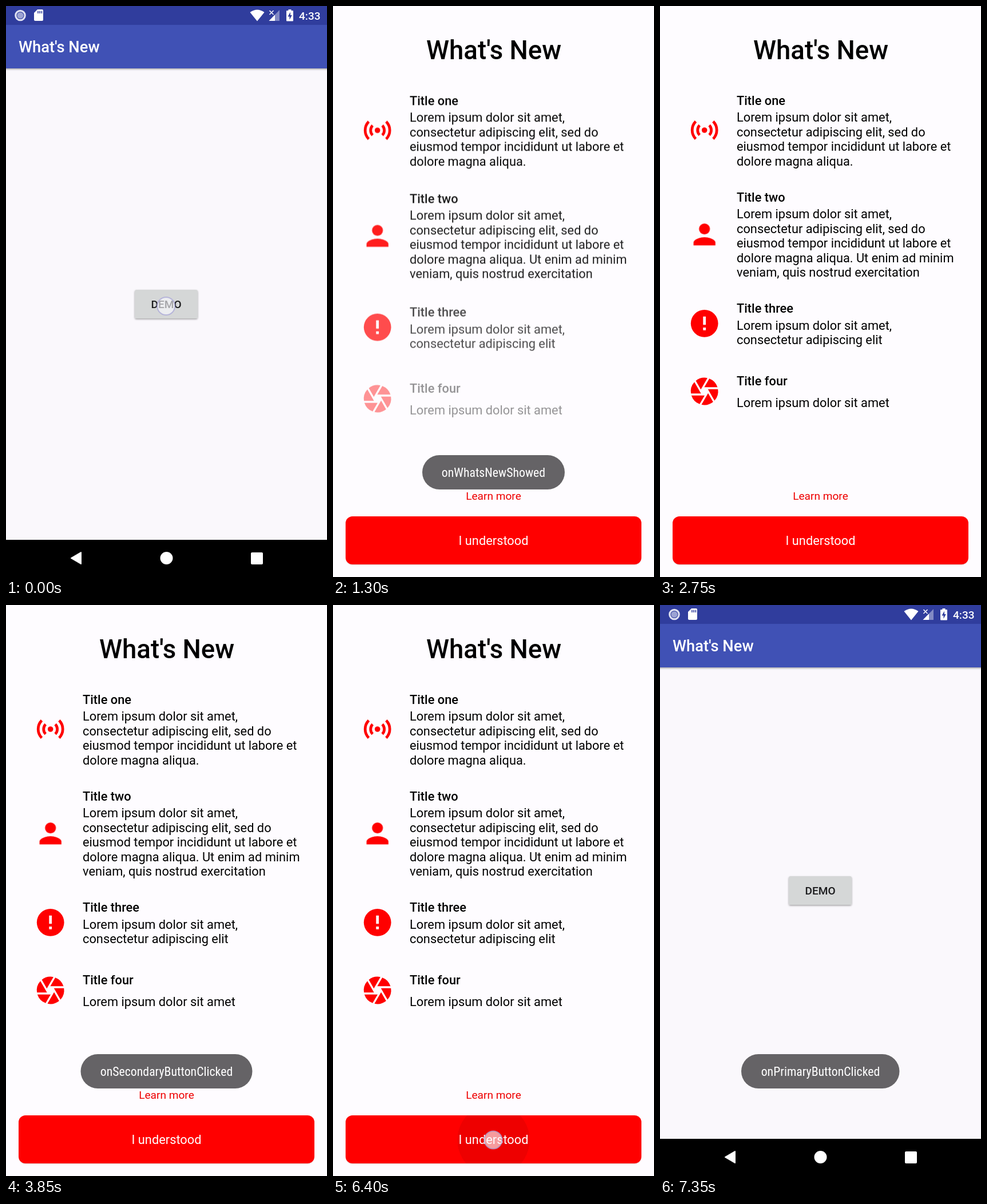
These frames come from a looping animation (561x998 px, 8 s). An HTML page:

```html
<!DOCTYPE html>
<html lang="en">
<head>
<meta charset="utf-8">
<title>What's New</title>
<style>
  html, body { margin: 0; width: 100%; height: 100%; overflow: hidden; background: #faf8fc; }
  svg { display: block; width: 561px; height: 998px; font: 21.8px Roboto, sans-serif; }
  svg * { animation: 8s linear infinite both; }
  .bold { font-weight: 500; }
  .small { font-size: 19.1px; }
  .mid { text-anchor: middle; }
  .red { fill: #f00; }
  .arc { fill: none; stroke: #f00; stroke-width: 2; }

  /* demo screen */
  #demo { animation-name: settle; }
  @keyframes settle {
    0%, 8% { transform: translateY(22px); }
    8.01%, 100% { transform: none; }
  }
  .top { animation-name: top; }
  .bottom { animation-name: bottom; }
  @keyframes top {
    0%, 4.5% { transform: none; animation-timing-function: cubic-bezier(.33, 0, .67, .33); }
    7.5%, 89.125% { transform: translateY(-118px); animation-timing-function: cubic-bezier(.33, .67, .67, 1); }
    91.625%, 100% { transform: none; }
  }
  @keyframes bottom {
    0%, 4.5% { transform: none; animation-timing-function: cubic-bezier(.33, 0, .67, .33); }
    7.5%, 89.125% { transform: translateY(66px); animation-timing-function: cubic-bezier(.33, .67, .67, 1); }
    91.625%, 100% { transform: none; }
  }

  /* dialog */
  #dialog { animation-name: dialog; }
  @keyframes dialog {
    0%, 3.75% { opacity: 0; }
    8%, 83.125% { opacity: 1; }
    88%, 100% { opacity: 0; }
  }
  .item { animation-name: rise; animation-delay: calc(var(--i) * 108ms); }
  @keyframes rise {
    0%, 10.75% { opacity: 0; transform: translateY(22px); animation-timing-function: cubic-bezier(.33, .67, .67, 1); }
    17%, 100% { opacity: 1; transform: none; }
  }

  /* touches and ripples */
  .ripple { transform-box: fill-box; transform-origin: center; }
  #ripple1 { animation-name: ripple1; }
  #ripple2 { animation-name: ripple2; }
  @keyframes ripple1 {
    0%, .5% { transform: scale(.1); opacity: 0; }
    .8% { opacity: .12; }
    4% { transform: scale(1); opacity: .12; }
    6.5%, 100% { transform: scale(1); opacity: 0; }
  }
  @keyframes ripple2 {
    0%, 79.375% { transform: scale(.1); opacity: 0; }
    80% { opacity: .07; }
    83.5%, 88% { transform: scale(1); opacity: .07; }
    89%, 100% { transform: scale(1); opacity: 0; }
  }
  .touch { fill: #fafaff; fill-opacity: .62; stroke: #a6a3d6; stroke-opacity: .7; stroke-width: 2; animation-timing-function: step-end; }
  #touch1 { animation-name: touch1; }
  #touch2 { animation-name: touch2; }
  #touch3 { animation-name: touch3; }
  @keyframes touch1 { 0% { opacity: 1; } 1.25%, 100% { opacity: 0; } }
  @keyframes touch2 { 0% { opacity: 0; } 40% { opacity: 1; } 42.5%, 100% { opacity: 0; } }
  @keyframes touch3 { 0% { opacity: 0; } 79.375% { opacity: 1; } 81.25%, 100% { opacity: 0; } }

  /* toasts */
  .toast rect { fill: #656366; }
  .toast text { fill: #fff; font-family: "Roboto Condensed", Roboto, sans-serif; font-stretch: 75%; }
  .tight text { font-size: 20.5px; letter-spacing: -1px; }
  #toast1 { animation-name: toast1; }
  #toast2 { animation-name: toast2; }
  #toast3 { animation-name: toast3; }
  @keyframes toast1 {
    0%, 5.375% { opacity: 0; animation-timing-function: cubic-bezier(.33, .67, .67, 1); }
    10.375%, 28.875% { opacity: 1; animation-timing-function: cubic-bezier(.33, 0, .67, .33); }
    34.125%, 100% { opacity: 0; }
  }
  @keyframes toast2 {
    0%, 42.875% { opacity: 0; animation-timing-function: cubic-bezier(.33, .67, .67, 1); }
    47.875%, 69.36% { opacity: 1; }
    69.37% { opacity: .91; animation-timing-function: cubic-bezier(.33, .15, .67, .48); }
    73.3%, 100% { opacity: 0; }
  }
  @keyframes toast3 {
    0%, 83.15% { opacity: 0; animation-timing-function: cubic-bezier(.33, .67, .67, 1); }
    88.15%, 100% { opacity: 1; }
  }
</style>
</head>
<body>
<svg viewBox="0 0 561 998">
  <defs>
    <filter id="shadow" x="-10%" y="-20%" width="120%" height="150%">
      <feDropShadow dx="0" dy="1.5" stdDeviation="1.6" flood-color="#000" flood-opacity=".36"/>
    </filter>
    <clipPath id="demoClip"><rect x="225" y="474" width="110" height="50" rx="3"/></clipPath>
    <clipPath id="okClip"><rect x="22" y="892" width="517" height="84" rx="12"/></clipPath>
    <path id="blade" d="M9.54-3A10 10 0 0 0 3.54-9.34L-.12-3Z"/>
  </defs>

  <rect width="561" height="998" fill="#faf8fc"/>
  <g id="demo">
    <rect x="225" y="474" width="110" height="50" rx="3" fill="#d5d7d7" filter="url(#shadow)"/>
    <g clip-path="url(#demoClip)"><circle id="ripple1" class="ripple" cx="280" cy="502" r="62"/></g>
    <text class="bold small mid" x="280" y="506" fill="#1b1b1d">DEMO</text>
  </g>
  <g class="top">
    <rect x="-10" y="20" width="581" height="89" fill="#3f51b5" filter="url(#shadow)"/>
    <text class="bold" x="22" y="81" font-size="27.3" fill="#fff">What's New</text>
  </g>

  <g id="dialog">
    <rect width="561" height="998" fill="#fefcff"/>
    <text class="bold mid" x="281" y="93" font-size="45.5">What's New</text>

    <g class="item" style="--i:0">
      <g transform="translate(77.7 217) scale(2.39)">
        <circle class="red" r="2"/>
        <path class="arc" d="M-6.36-6.36A9 9 0 0 0-6.36 6.36M6.36-6.36A9 9 0 0 1 6.36 6.36M-3.54-3.54A5 5 0 0 0-3.54 3.54M3.54-3.54A5 5 0 0 1 3.54 3.54"/>
      </g>
      <text class="bold" x="134" y="172.5">Title one</text>
      <text y="202.3">
        <tspan x="134">Lorem ipsum dolor sit amet,</tspan>
        <tspan x="134" dy="25.5">consectetur adipiscing elit, sed do</tspan>
        <tspan x="134" dy="25.5">eiusmod tempor incididunt ut labore et</tspan>
        <tspan x="134" dy="25.5">dolore magna aliqua.</tspan>
      </text>
    </g>

    <g class="item" style="--i:1">
      <g class="red" transform="translate(77.7 399.3) scale(2.39)">
        <circle cy="-4" r="4"/>
        <path d="M0 2C-2.67 2-8 3.34-8 6V8H8V6C8 3.34 2.67 2 0 2Z"/>
      </g>
      <text class="bold" x="134" y="341.5">Title two</text>
      <text y="371.3">
        <tspan x="134">Lorem ipsum dolor sit amet,</tspan>
        <tspan x="134" dy="25.5">consectetur adipiscing elit, sed do</tspan>
        <tspan x="134" dy="25.5">eiusmod tempor incididunt ut labore et</tspan>
        <tspan x="134" dy="25.5">dolore magna aliqua. Ut enim ad minim</tspan>
        <tspan x="134" dy="25.5">veniam, quis nostrud exercitation</tspan>
      </text>
    </g>

    <g class="item" style="--i:2">
      <g transform="translate(77.7 554.8) scale(2.39)">
        <circle class="red" r="10"/>
        <path d="M-1-5H1V1H-1ZM-1 3H1V5H-1Z" fill="#fefcff"/>
      </g>
      <text class="bold" x="134" y="536">Title three</text>
      <text y="565.8">
        <tspan x="134">Lorem ipsum dolor sit amet,</tspan>
        <tspan x="134" dy="25.5">consectetur adipiscing elit</tspan>
      </text>
    </g>

    <g class="item" style="--i:3">
      <g class="red" transform="translate(77.7 673.5) scale(2.39)">
        <use href="#blade"/>
        <use href="#blade" transform="rotate(60)"/>
        <use href="#blade" transform="rotate(120)"/>
        <use href="#blade" transform="rotate(180)"/>
        <use href="#blade" transform="rotate(240)"/>
        <use href="#blade" transform="rotate(300)"/>
      </g>
      <text class="bold" x="134" y="663">Title four</text>
      <text x="134" y="701.3">Lorem ipsum dolor sit amet</text>
    </g>

    <text class="small mid" x="280.5" y="863.3" fill="#ee0000">Learn more</text>
    <rect x="22" y="893" width="517" height="84" rx="12" fill="#000" opacity=".12"/>
    <rect class="red" x="22" y="892" width="517" height="84" rx="12"/>
    <g clip-path="url(#okClip)"><circle id="ripple2" class="ripple" cx="280.5" cy="935" r="264"/></g>
    <text class="mid" x="280.5" y="942.3" fill="#fff">I understood</text>
  </g>

  <g class="top">
    <rect width="561" height="33" fill="#303d9d"/>
    <g fill="#fff">
      <circle cx="25" cy="16.5" r="8.2" fill="#303d9d" stroke="#dfe1f1" stroke-width="3.2"/>
      <circle cx="25" cy="16.5" r="5.6" fill="#9ca3d3"/>
      <path d="M55 6H63Q65 6 65 8V24Q65 26 63 26H51Q49 26 49 24V12Z"/>
      <path d="M56 8.5V13M59.2 8.5V13M62.4 8.5V13" stroke="#303d9d" stroke-width="1.6"/>
      <path d="M439 26.5L426.5 11Q439 2 451.500 11Z"/>
      <path d="M478 7V26H459.500Z" opacity=".4"/>
      <path d="M470 15.200V26H459.500Z"/>
      <path d="M460.500 8L467.500 15M467.500 8L460.500 15" stroke="#fff" stroke-width="1.500"/>
      <path d="M493.500 8V6H498.500V8H501Q502 8 502 9V25.500Q502 26.500 501 26.500H491Q490 26.500 490 25.500V9Q490 8 491 8Z"/>
      <path d="M497 10.500L492.500 18.500H495.500V24L499.800 16H497Z" fill="#303d9d"/>
      <text class="bold small" x="512" y="23.7">4:33</text>
    </g>
  </g>
  <g class="bottom">
    <rect y="933" width="561" height="66"/>
    <g fill="#fff" stroke="#fff" stroke-linejoin="round" stroke-width="2">
      <path d="M114 965L131 955V975Z"/>
      <circle cx="280.500" cy="965" r="10"/>
      <rect x="429" y="956" width="19" height="19" rx="1"/>
    </g>
  </g>

  <g class="toast" id="toast1">
    <rect x="156" y="785" width="249" height="60" rx="30"/>
    <text class="mid" x="280.500" y="823.300">onWhatsNewShowed</text>
  </g>
  <g class="toast" id="toast2">
    <rect x="130.500" y="785" width="300" height="60" rx="30"/>
    <text class="mid" x="280.500" y="823.300">onSecondaryButtonClicked</text>
  </g>
  <g class="toast" id="toast3">
    <rect x="142" y="785" width="276.500" height="60" rx="30"/>
    <text class="mid" x="280.500" y="823.300">onPrimaryButtonClicked</text>
  </g>

  <circle class="touch" id="touch1" cx="279.700" cy="524.500" r="15.500"/>
  <circle class="touch" id="touch2" cx="279" cy="861" r="15.500"/>
  <circle class="touch" id="touch3" cx="280" cy="935" r="15.500"/>
</svg>
<script>
  // Tighter tracking where no condensed face is installed.
  const toasts = [...document.querySelectorAll('.toast')];
  if (toasts[0].querySelector('text').getComputedTextLength() > 195)
    toasts.forEach(toast => toast.classList.add('tight'));
</script>
</body>
</html>
```
